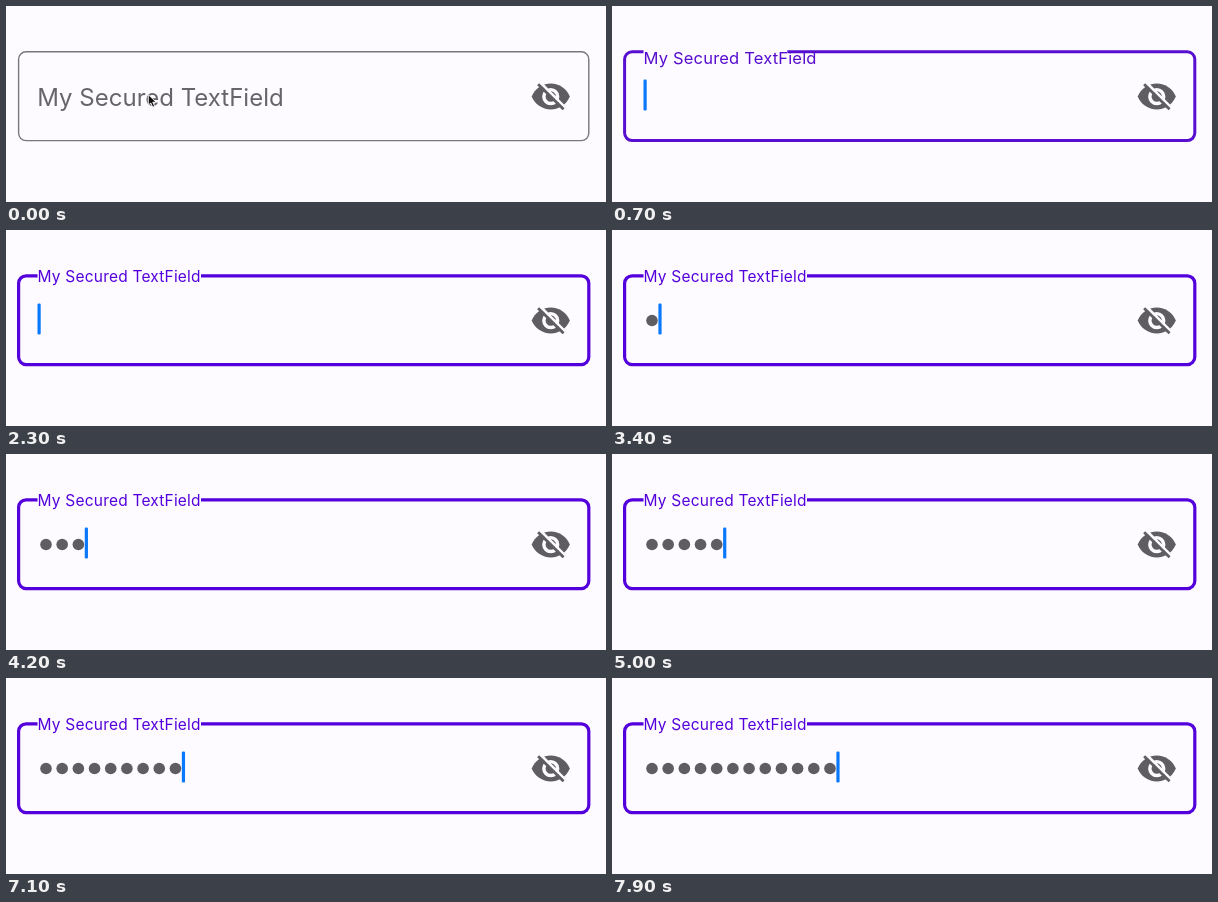
An HTML page that plays this animation: 600 px wide and 196 px high, repeating every 8 s.

```html
<!DOCTYPE html>
<html lang="en">
<head>
<meta charset="utf-8">
<title>Secured text field</title>
<style>
  html, body { margin: 0; width: 100%; height: 100%; overflow: hidden; background: #fdfbff; }
  svg { display: block; width: 600px; height: 196px; }
  #label { font-family: Inter, Roboto, sans-serif; }
</style>
</head>
<body>
<svg viewBox="0 0 600 196">
  <rect id="border" x="12.6" y="45.8" width="570.2" height="88.8" rx="7.5" fill="none"/>
  <rect id="notch" x="31.5" y="42" height="8" fill="#fdfbff"/>
  <text id="label"></text>
  <g id="dots" fill="#5f5d61"></g>
  <rect id="caret" y="73.5" width="3.2" height="31" rx="1.2" fill="#0a78fb"/>
  <g transform="translate(524 69.8) scale(1.73)">
    <path fill="#5f5d61" d="M12 4.5C7 4.5 2.73 7.61 1 12c1.73 4.39 6 7.5 11 7.5s9.27-3.11 11-7.5c-1.73-4.39-6-7.5-11-7.5z"/>
    <circle cx="12" cy="12" r="4" fill="#5f5d61" stroke="#fdfbff" stroke-width="2"/>
    <path d="M5.9 3.9L21 19" stroke="#fdfbff" stroke-width="1.6"/>
    <path d="M4.7 4.9L19.4 19.3" stroke="#5f5d61" stroke-width="1.6"/>
  </g>
  <path id="pointer" d="M142.3 88.6v10.6l2.5-2.2 1.9 4.2 2-.9-1.9-4.1h3.4z" fill="#111" stroke="#fff" stroke-width=".9"/>
</svg>
<script>
const LOOP = 8000, FOCUS = 560, FLOAT = 180, BLINK = 950, CARET_IN = 400;
const KEYS = [3000, 3600, 4100, 4700, 5000, 5300, 6100, 6500, 6900, 7400, 7600, 7800];
const STEP = 16.18;
const $ = id => document.getElementById(id);
const set = (el, attrs) => { for (const k in attrs) el.setAttribute(k, attrs[k]); };
const clamp = v => Math.min(1, Math.max(0, v));
const mix = (a, b, p) => a + (b - a) * p;
const tint = (a, b, p) => `rgb(${a.map((v, i) => Math.round(mix(v, b[i], p)))})`;
const GREY = [102, 100, 104], LINE = [121, 119, 123], PURPLE = [84, 0, 220];

$('label').textContent = 'My Secured TextField';
const dots = KEYS.map((_, i) => {
  const dot = document.createElementNS('http://www.w3.org/2000/svg', 'circle');
  set(dot, { cx: 40 + i * STEP, cy: 90.5, r: 5.8 });
  return $('dots').appendChild(dot);
});

// Solid, fade out, hidden, fade in; each key restarts the cycle.
function caretAlpha(t, count) {
  if (t < CARET_IN) return clamp((t - 220) / 150);
  const phase = (t - (count ? KEYS[count - 1] : CARET_IN)) % BLINK;
  return phase < 600 ? 1 - clamp((phase - 440) / 160) : clamp((phase - 760) / 170);
}

function draw(t) {
  const raw = clamp((t - FOCUS) / FLOAT);
  const p = raw * raw * (3 - 2 * raw);
  const count = KEYS.filter(k => k <= t).length;
  set($('border'), { stroke: tint(LINE, PURPLE, p), 'stroke-width': mix(1.4, 3.2, p) });
  set($('notch'), { width: 163.5 * p });
  set($('label'), {
    x: mix(31.3, 31.6, p), y: mix(99.5, 52.2, p),
    'font-size': mix(24, 15.5, p), 'letter-spacing': mix(0, 0.2, p),
    fill: tint(GREY, PURPLE, p)
  });
  dots.forEach((dot, i) => set(dot, { opacity: i < count ? 1 : 0 }));
  set($('caret'), {
    x: count ? 46.4 + (count - 1) * STEP : 31.5,
    opacity: caretAlpha(t, count)
  });
  set($('pointer'), { opacity: t < FOCUS ? 1 : 0 });
}

function tick() {
  draw(performance.now() % LOOP);
  requestAnimationFrame(tick);
}
tick();
</script>
</body>
</html>
```
